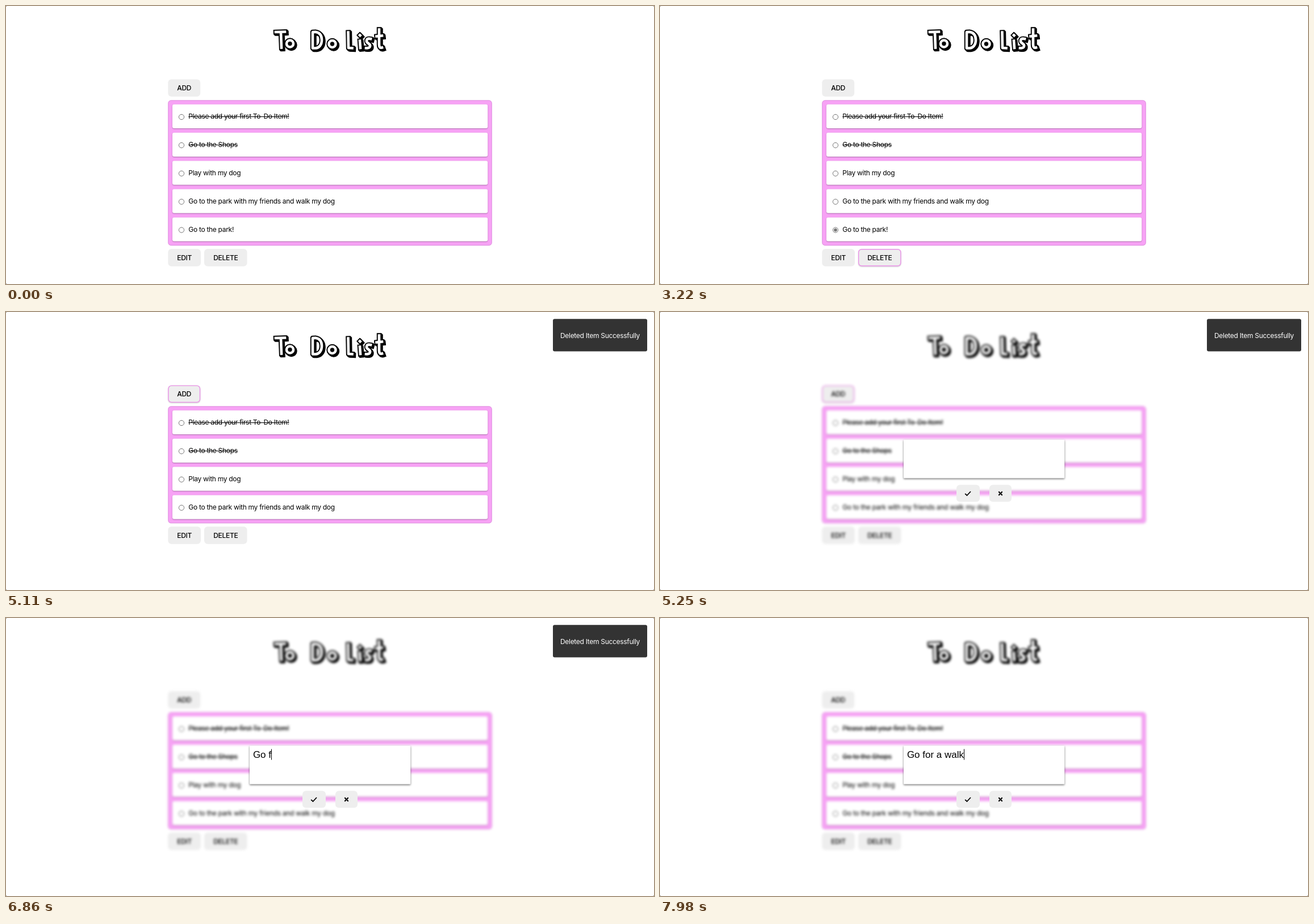
Recreate the animation shown at these times as an HTML page with a canvas. Size 1141 px wide and 491 px high, loop 8 s.

```html
<!DOCTYPE html>
<html lang="en">
<head>
<meta charset="utf-8">
<title>To Do List</title>
<style>
  html, body { margin: 0; width: 100%; height: 100%; overflow: hidden; background: #fff; }
  canvas { display: block; }
</style>
</head>
<body>
<canvas id="stage" width="1141" height="491" role="img" aria-label="To Do List"></canvas>
<script>
const LOOP = 8000;
const PINK = '#f7a2f5';
const UI_FONT = '12px Inter, sans-serif';
const BUTTON_FONT = '500 12px Inter, sans-serif';
const INPUT_FONT = '17px "Liberation Sans", Arial, sans-serif';

const stage = document.getElementById('stage');
const screen = stage.getContext('2d');
const pageCanvas = document.createElement('canvas');
pageCanvas.width = stage.width;
pageCanvas.height = stage.height;
const page = pageCanvas.getContext('2d');

const items = [
  { text: 'Please add your first To-Do Item!', done: true },
  { text: 'Go to the Shops', done: true },
  { text: 'Play with my dog' },
  { text: 'Go to the park with my friends and walk my dog' },
  { text: 'Go to the park!' }
];

// Centre lines of the title letters
const titleLetters = [
  'M475 46L491 45.5M484 46L485 73.5',
  'M494 66.5a6 6 0 1 0 12 0a6 6 0 1 0 -12 0Z',
  'M540 46L545 45.7C553 47 556 53 556 60C556 69 551 74 545 74.5L540 74.5Z',
  'M568.5 67a6 6 0 1 0 12 0a6 6 0 1 0 -12 0Z',
  'M602.5 46.5L603 74L609.5 74.3',
  'M623 51.5L623.5 52M623 61.5L624 74',
  'M642 58C634 56 633 63 638 66C643 69 642 75 634 74.3',
  'M657 41.5L657 68C657 73 659 74.5 662 73.5M652.5 53.5L662 52.5'
].map(d => new Path2D(d));

const typed = 'Go for a walk';
const keyTimes = [6510, 6650, 6790, 6860, 7000, 7140, 7210, 7350, 7420, 7630, 7840, 7910, 7980];

function box(ctx, x, y, w, h, r, fill) {
  ctx.beginPath();
  ctx.roundRect(x, y, w, h, r);
  ctx.fillStyle = fill;
  ctx.fill();
}

function shadowBox(ctx, x, y, w, h, r, fill, dy, blur, alpha) {
  ctx.save();
  ctx.shadowColor = `rgba(0,0,0,${alpha})`;
  ctx.shadowOffsetY = dy;
  ctx.shadowBlur = blur;
  box(ctx, x, y, w, h, r, fill);
  ctx.restore();
}

function label(ctx, text, x, y, font, color = '#000', align = 'left', spacing = '-0.3px') {
  ctx.font = font;
  ctx.letterSpacing = spacing;
  ctx.textAlign = align;
  ctx.fillStyle = color;
  ctx.fillText(text, x, y);
  return ctx.measureText(text).width;
}

function line(ctx, points, width) {
  ctx.beginPath();
  points.forEach(([x, y], i) => i ? ctx.lineTo(x, y) : ctx.moveTo(x, y));
  ctx.lineWidth = width;
  ctx.strokeStyle = '#000';
  ctx.stroke();
}

function button(ctx, text, x, y, w, hover) {
  if (hover) {
    shadowBox(ctx, x, y, w, 30.7, 6, '#eee', 1, 2, 0.2);
    ctx.beginPath();
    ctx.roundRect(x + 0.7, y + 0.7, w - 1.4, 29.3, 5.5);
    ctx.lineWidth = 1.4;
    ctx.strokeStyle = '#ea92e8';
    ctx.stroke();
  } else {
    box(ctx, x, y, w, 30.7, 6, '#eee');
  }
  label(ctx, text, x + w / 2, y + 19.7, BUTTON_FONT, '#000', 'center');
}

function title(ctx) {
  ctx.save();
  ctx.lineCap = 'square';
  ctx.lineJoin = 'round';
  for (const letter of titleLetters) {
    ctx.strokeStyle = '#000';
    ctx.lineWidth = 8.4;
    for (let d = 2.5; d >= 0; d -= 0.5) {
      ctx.save();
      ctx.translate(d, d);
      ctx.stroke(letter);
      ctx.restore();
    }
    ctx.strokeStyle = '#fff';
    ctx.lineWidth = 4.6;
    ctx.stroke(letter);
  }
  ctx.restore();
}

function radio(ctx, x, y, color, checked) {
  ctx.beginPath();
  ctx.arc(x, y, 4.6, 0, Math.PI * 2);
  ctx.lineWidth = 1;
  ctx.strokeStyle = color;
  ctx.stroke();
  if (!checked) return;
  ctx.beginPath();
  ctx.arc(x, y, 2.9, 0, Math.PI * 2);
  ctx.fillStyle = color;
  ctx.fill();
}

function radioColor(t) {
  if (t >= 2380 && t < 2520) return '#8d8d8d';
  const hovered = (t >= 1470 && t < 1820) || (t >= 2100 && t < 2660);
  return hovered ? '#4f4f4f' : '#767676';
}

function drawPage(ctx, t) {
  const count = t < 3360 ? 5 : 4;
  const listHeight = 7.4 + 49.9 * count;
  ctx.clearRect(0, 0, stage.width, stage.height);
  title(ctx);
  button(ctx, 'ADD', 285.3, 129.4, 56.9, t >= 5110 && t < 6020);

  box(ctx, 285.2, 166.3, 570.6, listHeight, 5.5, PINK);
  ctx.beginPath();
  ctx.roundRect(285.7, 166.8, 569.6, listHeight - 1, 5);
  ctx.lineWidth = 1;
  ctx.strokeStyle = 'rgba(90,60,100,0.16)';
  ctx.stroke();

  items.slice(0, count).forEach((item, i) => {
    const y = 173.8 + 49.9 * i;
    const last = i === 4;
    shadowBox(ctx, 293, y, 555.2, 42.2, 3, '#fff', 1, 2, 0.3);
    radio(ctx, 309, y + 22.2, last ? radioColor(t) : '#767676', last && t >= 2520);
    const width = label(ctx, item.text, 321.3, y + 25.5, UI_FONT);
    if (item.done) line(ctx, [[321.3, y + 21.7], [321.3 + width, y + 21.7]], 1);
  });

  const footer = 166.3 + listHeight + 5.8;
  button(ctx, 'EDIT', 285.3, footer, 57.7, false);
  button(ctx, 'DELETE', 349, footer, 75.6, t >= 3220 && t < 5110);
}

function drawDialog(ctx, t) {
  shadowBox(ctx, 429, 225.5, 283.2, 68, 1, '#fff', 1.5, 3.5, 0.55);
  box(ctx, 522, 305.3, 41, 30, 6, '#eee');
  box(ctx, 580, 305.3, 39, 30, 6, '#eee');
  line(ctx, [[537.2, 320.8], [540.5, 324], [547, 317]], 1.8);
  line(ctx, [[596.3, 317.3], [602.7, 323.7]], 2);
  line(ctx, [[602.7, 317.3], [596.3, 323.7]], 2);
  if (t < 6020) return;
  const text = typed.slice(0, keyTimes.filter(key => key <= t).length);
  const width = label(ctx, text, 434.9, 247, INPUT_FONT, '#000', 'left', '0px');
  ctx.fillRect(Math.floor(435 + width), 231.5, 1, 19);
}

function drawToast(ctx) {
  box(ctx, 963, 12.2, 166, 57.3, 3, '#333');
  label(ctx, 'Deleted Item Successfully', 1046, 45.5, UI_FONT, '#fff', 'center');
}

function drawCorners(ctx) {
  ctx.fillStyle = '#777';
  for (const x of [0, stage.width - 1])
    for (const y of [0, stage.height - 1]) ctx.fillRect(x, y, 1, 1);
}

function render(t) {
  const dialogOpen = t >= 5250;
  drawPage(page, t);
  screen.fillStyle = '#fff';
  screen.fillRect(0, 0, stage.width, stage.height);
  screen.filter = dialogOpen ? 'blur(2px)' : 'none';
  screen.drawImage(pageCanvas, 0, 0);
  screen.filter = 'none';
  if (dialogOpen) drawDialog(screen, t);
  if (t >= 3360 && t < 7630) drawToast(screen);
  drawCorners(screen);
}

const start = performance.now();
function tick() {
  render((performance.now() - start) % LOOP);
  requestAnimationFrame(tick);
}
tick();
</script>
</body>
</html>
```
